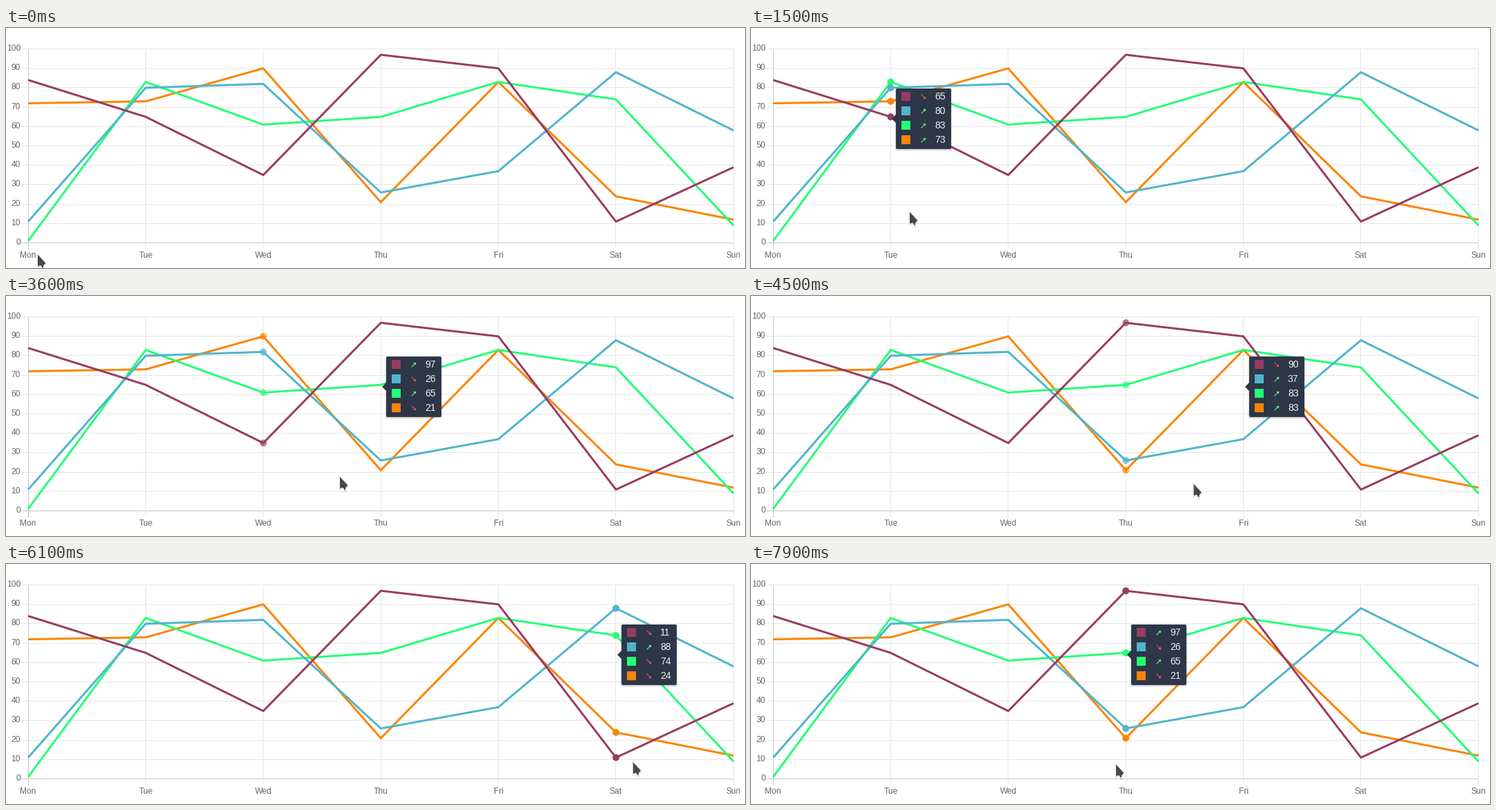
Animation of 1071x349 px, one loop 8000 ms. Source, as a matplotlib script:

```python
import math

import matplotlib.pyplot as plt
from matplotlib.animation import FuncAnimation
from matplotlib.patches import Circle, FancyBboxPatch, Polygon, Rectangle
from matplotlib.transforms import Affine2D

W, H, DPI = 1071, 349, 64
PX = 72 / DPI
FRAMES, STEP_MS = 80, 100

LEFT, DAY_W = 32.1, 170.37
TOP, BOTTOM = 30.5, 312.5
DAYS = ["Mon", "Tue", "Wed", "Thu", "Fri", "Sat", "Sun"]
SERIES = [  # topmost first
    ("#9a3b62", [84, 65, 35, 97, 90, 11, 39]),
    ("#50b5cc", [11, 80, 82, 26, 37, 88, 58]),
    ("#24ff74", [1, 83, 61, 65, 83, 74, 9]),
    ("#fb8500", [72, 73, 90, 21, 83, 24, 12]),
]
UP, DOWN = "#6cf07c", "#ee4f5c"

# Pointer moves: start ms, end ms, end x, end y, sag of the path
START = (46, 330)
MOVES = [
    (0, 500, 72, 294, 0),
    (700, 1500, 230, 268, 0),
    (1900, 2300, 456, 266, 0),
    (2300, 2600, 379, 263, 0),
    (2700, 2800, 386, 260, 0),
    (3300, 3975, 623, 273, -2),
    (4300, 5100, 750, 278, 0),
    (5400, 6200, 915, 289, 0),
    (6400, 6900, 1027, 293, 7),
    (7300, 7800, 529, 292, 18),
]


def day_x(day):
    return LEFT + DAY_W * day


def value_y(value):
    return BOTTOM - (BOTTOM - TOP) * value / 100


def pointer(ms):
    x, y = START
    for begin, end, to_x, to_y, sag in MOVES:
        if ms <= begin:
            break
        u = min((ms - begin) / (end - begin), 1)
        ease = (1 - math.cos(math.pi * u)) / 2
        x += (to_x - x) * ease
        y += (to_y - y) * ease + sag * math.sin(math.pi * u)
    return x, y


def hovered_day(ms):
    x, y = pointer(ms)
    return round((x - LEFT) / DAY_W) if y <= BOTTOM else None


HOVER = [hovered_day(i * STEP_MS) for i in range(FRAMES)]


def dot_alphas(i):
    """Opacity of the dots by day: the old day fades out, the new one in."""
    start = i
    while start > 0 and HOVER[start - 1] == HOVER[i]:
        start -= 1
    age = i - start
    alphas = {}
    if start > 0 and HOVER[start - 1] is not None and age < 2:
        alphas[HOVER[start - 1]] = (0.7, 0.25)[age]
    if HOVER[i] is not None:
        alphas[HOVER[i]] = (0, 0.55, 1)[min(age, 2)]
    return alphas


fig = plt.figure(figsize=(W / DPI, H / DPI), dpi=DPI, facecolor="white")
ax = fig.add_axes([0, 0, 1, 1])
ax.set_xlim(0, W)
ax.set_ylim(H, 0)
ax.axis("off")


def line(xs, ys, color, width, z, **kw):
    return ax.plot(xs, ys, color=color, lw=width * PX, zorder=z, snap=False,
                   solid_capstyle="butt", solid_joinstyle="miter", **kw)[0]


def label(x, y, text, size, color, **kw):
    return ax.text(x, y, text, fontsize=size * PX, color=color,
                   family="Liberation Sans", va="baseline", **kw)


def draw_axes():
    for value in range(0, 101, 10):
        row = int(value_y(value))
        line([22, 1055], [row + 0.5] * 2, "#c6c6c6" if value == 0 else "#e5e5e5", 1, 1)
        label(21, row + 3, str(value), 12, "#666666", ha="right")
    for day, name in enumerate(DAYS):
        x = int(day_x(day)) + 0.5
        line([x, x], [30, 322], "#c6c6c6" if day == 0 else "#e5e5e5", 1, 1)
        label(day_x(day), 334, name, 12, "#666666", ha="center")


draw_axes()
dots = []
for k, (color, values) in enumerate(SERIES):
    line([day_x(d) for d in range(7)], [value_y(v) for v in values],
         color, 3, 5 - k * 0.1)
    for day, value in enumerate(values):
        dot = Circle((day_x(day), value_y(value)), 5, fc=color, lw=0,
                     zorder=6 - k * 0.1)
        dots.append((day, ax.add_patch(dot)))

# Tooltip, drawn around its own origin and shifted as one group
tip_shift, cursor_shift = Affine2D(), Affine2D()
tip_space = tip_shift + ax.transData
cursor_space = cursor_shift + ax.transData
TIP_W, TIP_H, TIP_Y = 80, 88, 88
tip_parts = []


def tip_add(patch):
    patch.set_transform(tip_space)
    patch.set_snap(False)
    tip_parts.append(ax.add_patch(patch))
    return patch


def tip_box(grow, drop, color, alpha):
    tip_add(FancyBboxPatch((-grow, drop - grow), TIP_W + 2 * grow, TIP_H + 2 * grow,
                           boxstyle=f"round,pad=0,rounding_size={2 + grow}",
                           fc=color, lw=0, alpha=alpha, zorder=8))


for grow in (2, 1, 0):
    tip_box(grow, 1, "black", 0.06)
tip_box(0, 0, "#2d3748", 1)
caret = tip_add(Polygon([(0, 38), (-6, 44), (0, 50)], fc="#2d3748", lw=0, zorder=8))

rows = []
for k, (color, values) in enumerate(SERIES):
    mid = 11.5 + 21 * k
    tip_add(Rectangle((8, mid - 6.5), 13, 13, fc=color, lw=0, zorder=9))
    shaft = line([], [], UP, 1.1, 9, transform=tip_space)
    head = tip_add(Polygon([(0, 0)] * 3, lw=0, zorder=9))
    number = label(56, mid + 4.5, "", 14, "#eeeeee", transform=tip_space, zorder=9)
    tip_parts += [shaft, number]
    rows.append((mid + 0.5, values, shaft, head, number))

ARROW = [(0, -0.5), (0, 16.5), (4.2, 15.2), (7.6, 19.5), (8.4, 15.2), (11.4, 11.8)]
ax.add_patch(Polygon([(x, y + 1) for x, y in ARROW], fc="none", ec="black",
                     lw=3 * PX, alpha=0.1, zorder=10, transform=cursor_space))
ax.add_patch(Polygon(ARROW, fc="#484848", ec="white", lw=1.6 * PX, zorder=11,
                     transform=cursor_space))
ax.add_patch(Polygon(ARROW, fc="#484848", lw=0, zorder=12, transform=cursor_space))


def place_tooltip(day):
    for part in tip_parts:
        part.set_visible(day is not None)
    if day is None:
        return
    x = day_x(day)
    on_left = x + 8 + TIP_W > W
    tip_shift.clear().translate(round(x - 8 - TIP_W if on_left else x + 8), TIP_Y)
    edge, point = (TIP_W, TIP_W + 6) if on_left else (0, -6)
    caret.set_xy([(edge, 38), (point, 44), (edge, 50)])
    for mid, values, shaft, head, number in rows:
        number.set_text(str(values[day]))
        shaft.set_visible(day > 0)
        head.set_visible(day > 0)
        if day == 0:
            continue
        rising = values[day] > values[day - 1]
        s, color = (1, UP) if rising else (-1, DOWN)
        shaft.set_data([36.6, 41.5], [mid + 3.4 * s, mid - 1.5 * s])
        head.set_xy([(43.3, mid - 3.3 * s), (39.3, mid - 2.7 * s),
                     (42.7, mid + 0.7 * s)])
        shaft.set_color(color)
        head.set_facecolor(color)


def update(i):
    alphas = dot_alphas(i)
    for day, dot in dots:
        dot.set_alpha(alphas.get(day, 0))
    place_tooltip(HOVER[i])
    cursor_shift.clear().translate(*pointer(i * STEP_MS))
    return []


anim = FuncAnimation(fig, update, frames=FRAMES, interval=STEP_MS,
                     init_func=lambda: update(0), repeat=True, repeat_delay=0)
plt.show()
```
